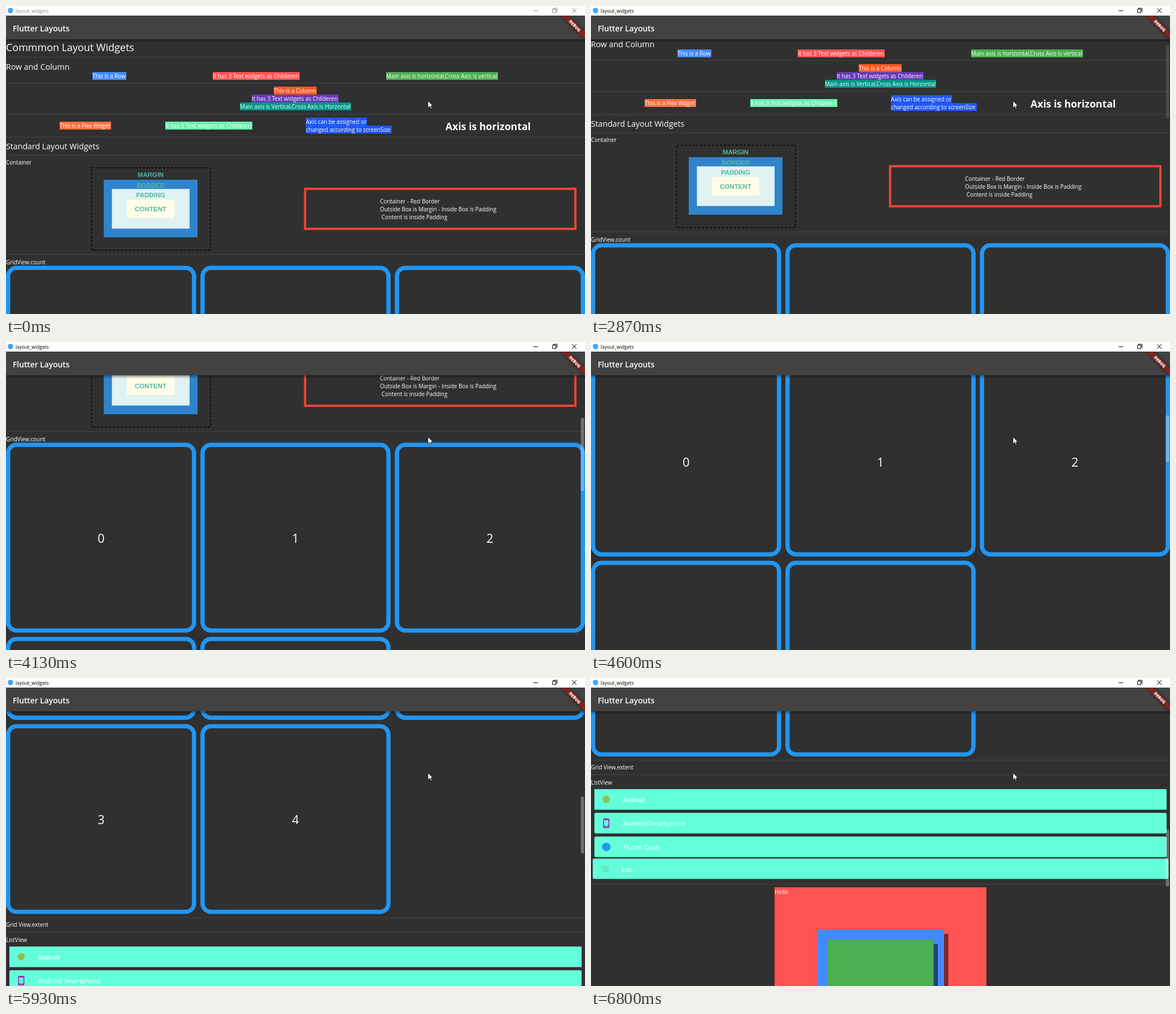
Animation of 1025x546 px, one loop 6990 ms. Source, as an HTML page with a canvas:

```html
<!DOCTYPE html>
<html lang="en">
<head>
<meta charset="utf-8">
<title>Flutter Layouts</title>
<style>
html, body { margin: 0; width: 100%; height: 100%; overflow: hidden; background: #303030; }
canvas { display: block; width: 100vw; height: 100vh; }
</style>
</head>
<body>
<canvas id="stage" width="1025" height="546"></canvas>
<script>
const W = 1025, H = 546, LOOP = 6990, BAR = 17, TOP = 59;
const g = document.getElementById('stage').getContext('2d');
const UI = '"Open Sans", "Noto Sans", sans-serif';
const ART = '"Liberation Sans", Arial, sans-serif';

// Swipes: [time, scroll offset], each offset held until the next.
const SCROLL = [
  [0, 0],
  [2800, 12], [2870, 40], [2930, 75], [3000, 108], [3070, 132], [3130, 145],
  [3470, 168], [3530, 200], [3600, 235], [3670, 258], [3730, 270],
  [4130, 282], [4200, 303], [4270, 328], [4330, 354], [4400, 378], [4470, 397], [4530, 411], [4600, 417],
  [5000, 609], [5330, 619], [5400, 625],
  [5800, 670], [5930, 723], [6000, 768], [6070, 790],
  [6400, 815], [6470, 852], [6530, 893], [6600, 930], [6670, 962], [6730, 987], [6800, 1002]
];

function rect(x, y, w, h, color) {
  g.fillStyle = color;
  g.fillRect(x, y, w, h);
}

function round(x, y, w, h, r, color) {
  g.fillStyle = color;
  g.beginPath();
  g.roundRect(x, y, w, h, r);
  g.fill();
}

function dot(x, y, r, color) {
  g.fillStyle = color;
  g.beginPath();
  g.arc(x, y, r, 0, Math.PI * 2);
  g.fill();
}

function text(str, x, y, size = 9.88, { weight = 400, color = '#fff', align = 'left', font = UI } = {}) {
  g.font = `${weight} ${size}px ${font}`;
  g.textAlign = align;
  g.fillStyle = color;
  g.fillText(str, x, y);
}

function label(str, x, y, w, color) {
  rect(x, y, w, 14, color);
  text(str, x, y + 11);
}

const divider = y => rect(0, y, W, 1, '#444444');

function intro() {
  text('Commmon Layout Widgets', 0, 79.5, 17.95);
  divider(90);
  text('Row and Column', 0, 112.5, 14.2);
  label('This is a Row', 153, 117, 60, '#448aff');
  label('It has 3 Text widgets as Childeren', 366, 117, 154, '#ff5252');
  label('Main axis is horizontal,Cross Axis is vertical', 673, 117, 198, '#4caf50');
  divider(136);
  label('This is a Column', 474, 143, 76, '#ff5722');
  label('It has 3 Text widgets as Childeren', 435, 157, 154, '#673ab7');
  label('Main axis is Vertical,Cross Axis is Horzontal', 414, 171, 197, '#009688');
  divider(191);
  label('This is a Flex Wdget', 95, 205, 91, '#ff6e40');
  label('It has 3 Text widgets as Childeren', 282, 205, 154, '#69f0ae');
  label('Axis can be assigned or', 531, 198, 108, '#2257f2');
  label('changed according to screenSize', 531, 212, 152, '#2257f2');
  text('Axis is horizontal', 778, 219.5, 17.7, { weight: 700 });
  divider(232);
  text('Standard Layout Widgets', 0, 254.3, 14.2);
  divider(264);
}

function boxModel() {
  text('Container', 0, 281);
  g.strokeStyle = '#000';
  g.lineWidth = 1.5;
  g.setLineDash([4, 3]);
  g.strokeRect(151.5, 286.7, 210.5, 146);
  g.setLineDash([]);
  rect(173, 308, 166, 102, '#2f84cc');
  rect(187.5, 324.3, 137.5, 70.3, '#e0f2f1');
  rect(214, 343, 84, 33, '#fffde7');
  const teal = { weight: 700, color: '#52b9a3', align: 'center', font: ART };
  text('MARGIN', 256, 302.5, 11.4, teal);
  text('BORDER', 256, 321.5, 11.4, teal);
  text('PADDING', 256, 339.3, 11.4, teal);
  text('CONTENT', 256, 364, 11.6, teal);

  g.strokeStyle = '#f44336';
  g.lineWidth = 4;
  g.strokeRect(529.5, 324, 478.5, 71);
  text('Container - Red Border', 662, 349.5);
  text('Outside Box is Margin - Inside Box is Padding', 662, 364);
  text('Content is inside Padding', 664.7, 378);
  divider(440);
}

function grid() {
  text('GridView.count', 0, 457.5);
  const size = 336.67, gap = 7.5, line = 7.5;
  g.strokeStyle = '#2196f3';
  g.lineWidth = line;
  for (let i = 0; i < 5; i++) {
    const x = (i % 3) * (size + gap);
    const y = 460.5 + Math.floor(i / 3) * (size + gap);
    g.beginPath();
    g.roundRect(x + line / 2, y + line / 2, size - line, size - line, 15);
    g.stroke();
    text(String(i), x + size / 2, y + 177.3, 21.5, { align: 'center' });
  }
  divider(1147);
  text('Grid View.extent', 0, 1164);
  divider(1173);
  text('ListView', 0, 1190.5);
}

function phoneIcon(x, y) {
  round(x, y, 11, 17, 2, '#9c27b0');
  rect(x + 1.7, y + 3, 7.6, 10.5, '#64ffda');
  rect(x + 4, y + 14.6, 3, 0.9, '#64ffda');
}

function listIcon(x, y) {
  for (let i = 0; i < 3; i++) {
    rect(x, y + i * 3.6, 2, 1.6, '#58d2a4');
    rect(x + 3.5, y + i * 3.6, 11.5, 1.6, '#58d2a4');
  }
}

function list() {
  const mint = '#64ffda';
  rect(6, 1199, 1013, 36.5, mint);
  round(6, 1241, 1013, 36.5, 3, mint);
  round(6, 1283, 1013, 36.5, 3, mint);
  round(3, 1322, 1019, 36.3, 3, mint);
  dot(27, 1217, 6.5, '#8bc34a');
  phoneIcon(21.5, 1251);
  dot(27, 1301.5, 7.5, '#2196f3');
  listIcon(17, 1336);
  text('Android', 57, 1221.5, 9.9, { weight: 600 });
  text('Android Smartphone', 57, 1264.3, 11.33);
  text('Flutter Dash', 57, 1306.3, 11.33);
  text('List', 54, 1345.5, 11.33);
  divider(1367);
}

function stack() {
  const shade = 'rgba(0,0,0,.52)';
  rect(325, 1373, 375, 375, '#ff5252');
  text('Hello', 325, 1384.5);
  rect(407.5, 1455.7, 225, 225, shade);
  rect(400, 1448, 225, 225, '#448aff');
  rect(426.5, 1473.5, 187.5, 187.5, shade);
  rect(419, 1466, 187.5, 187.5, '#4caf50');
}

function thumb(s, alpha) {
  const view = H - TOP;
  // The estimated page length shifts as more of the list is laid out.
  const total = s < 414 ? 1825 : s < 560 ? 2857 : 2333;
  round(1017.5, TOP + s * view / total, 6, view * view / total, 3, `rgba(255,255,255,${0.3 * alpha})`);
}

function banner() {
  g.save();
  g.beginPath();
  g.rect(0, BAR, W, H);
  g.clip();
  g.translate(W, BAR);
  g.rotate(Math.PI / 4);
  g.shadowColor = 'rgba(0,0,0,.6)';
  g.shadowBlur = 5;
  rect(-30, 21, 60, 9, '#832222');
  g.shadowColor = 'transparent';
  text('DEBUG', 0, 28.2, 7.5, { weight: 800, align: 'center' });
  g.restore();
}

function appBar() {
  const fade = g.createLinearGradient(0, TOP, 0, TOP + 6);
  fade.addColorStop(0, 'rgba(0,0,0,.38)');
  fade.addColorStop(1, 'rgba(0,0,0,0)');
  rect(0, TOP, W, 6, fade);
  rect(0, BAR, W, TOP - BAR, '#424242');
  text('Flutter Layouts', 12, 45, 13.8, { weight: 600 });
  banner();
}

function titleBar(active) {
  const ink = active ? '#000' : '#8c8c8c';
  rect(0, 0, W, BAR, '#fff');
  dot(8, 8, 4.8, '#42a5f5');
  text('layout_widgets', 17, 11.7, 8.5, { color: ink });
  g.strokeStyle = ink;
  g.lineWidth = 1;
  g.beginPath();
  g.moveTo(934, 8.5);
  g.lineTo(942, 8.5);
  g.rect(967.5, 5.5, 6, 6);
  g.moveTo(969.5, 5.5);
  g.lineTo(969.5, 3.9);
  g.lineTo(975.5, 3.9);
  g.lineTo(975.5, 9.5);
  g.lineTo(973.5, 9.5);
  g.moveTo(1002, 4);
  g.lineTo(1010, 12);
  g.moveTo(1010, 4);
  g.lineTo(1002, 12);
  g.stroke();
}

function cursor(x, y) {
  g.beginPath();
  g.moveTo(x, y);
  for (const [dx, dy] of [[0, 12.5], [2.9, 9.9], [4.8, 14.3], [6.8, 13.4], [4.9, 9.2], [8.8, 9.2]]) {
    g.lineTo(x + dx, y + dy);
  }
  g.closePath();
  g.fillStyle = '#fff';
  g.fill();
  g.strokeStyle = '#000';
  g.lineWidth = 0.8;
  g.stroke();
}

function draw(t) {
  const [since, s] = SCROLL.findLast(k => k[0] <= t);
  rect(0, 0, W, H, '#303030');
  g.save();
  g.translate(0, -s);
  intro();
  boxModel();
  grid();
  list();
  stack();
  g.restore();
  if (s > 0) thumb(s, Math.min(1, (since - 2750) / 300));
  appBar();
  titleBar(t >= 2130);
  cursor(747, 168);
}

const start = performance.now();
function tick() {
  draw((performance.now() - start) % LOOP);
  requestAnimationFrame(tick);
}
tick();
</script>
</body>
</html>
```
